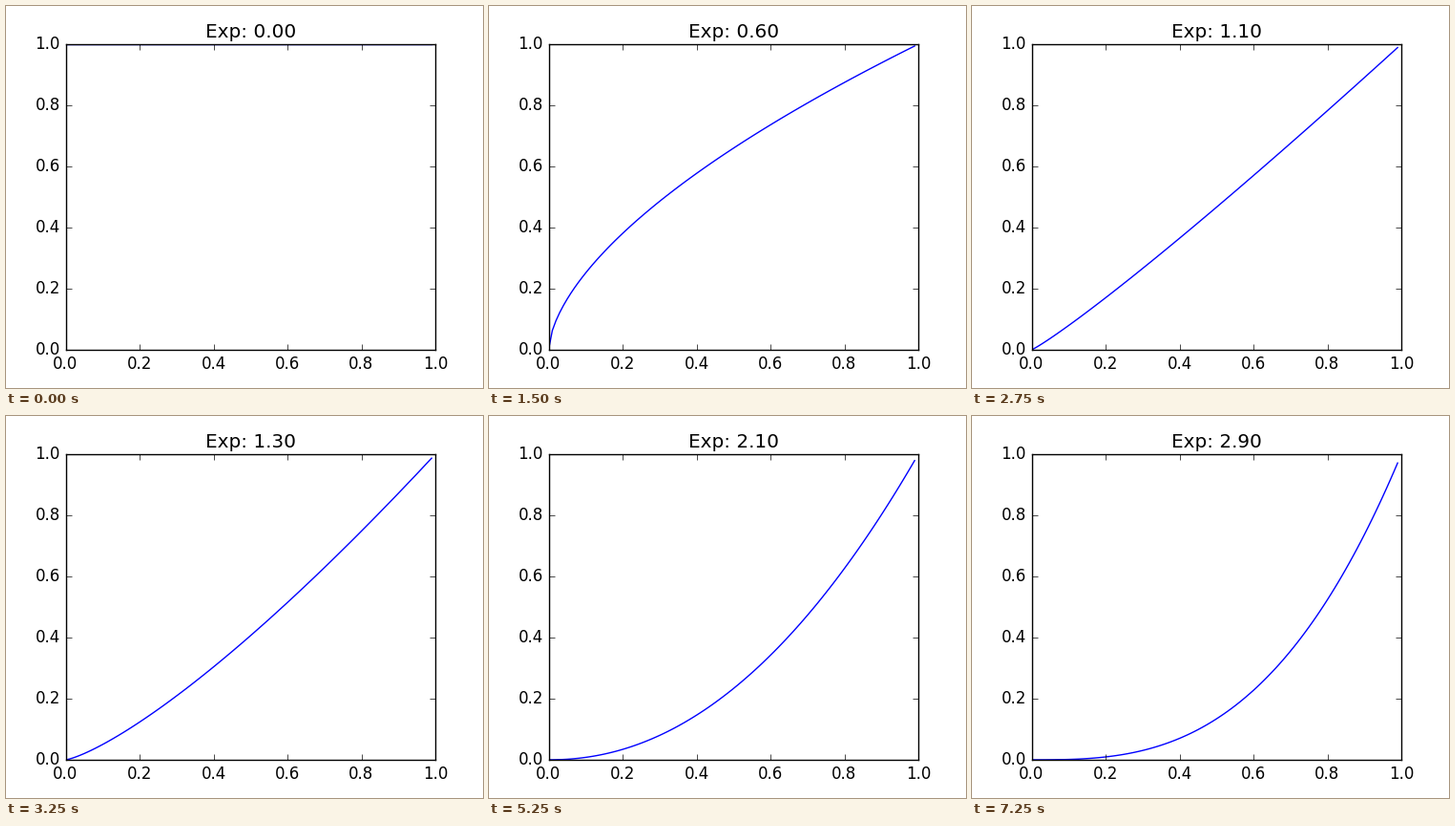
A matplotlib script that plays this animation: 500x400 px, repeating every 7500 ms.

```python
import matplotlib.pyplot as plt
import numpy as np
from matplotlib.animation import FuncAnimation

FRAMES = 30
INTERVAL = 250  # ms
STEP = 0.1      # growth of the exponent per frame

plt.style.use("classic")
plt.rcParams.update({
    "font.family": "DejaVu Sans",
    "figure.dpi": 100,
    "savefig.dpi": 100,
    "figure.facecolor": "white",
})

fig, ax = plt.subplots(figsize=(5, 4))
ax.set_xlim(0, 1)
ax.set_ylim(0, 1)

x = np.arange(0, 1, 0.01)
line, = ax.plot(x, x**0, color="blue", lw=1)
title = ax.set_title("Exp: 0.00")


def update(i):
    exponent = i * STEP
    line.set_ydata(x**exponent)
    title.set_text(f"Exp: {exponent:.2f}")
    return line, title


anim = FuncAnimation(fig, update, frames=FRAMES, interval=INTERVAL,
                     repeat=True, repeat_delay=0)
plt.show()
```
